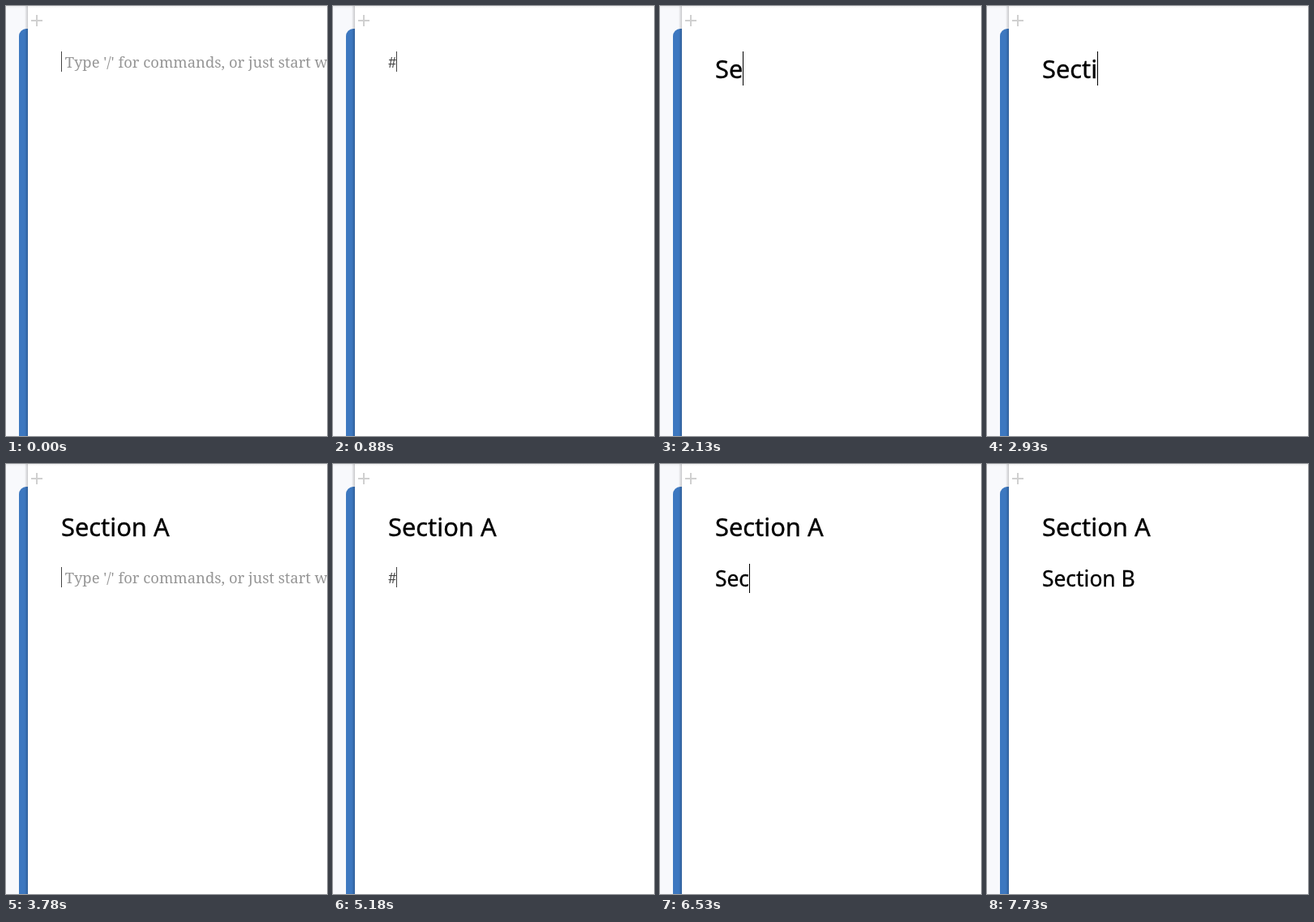
Recreate the animation shown at these times as an HTML page with a canvas. Size 396x530 px, loop 8 s.

```html
<!DOCTYPE html>
<html lang="en">
<head>
<meta charset="utf-8">
<title>Heading shortcuts</title>
<style>
html, body { margin: 0; width: 100%; height: 100%; overflow: hidden; background: #fff; }
canvas { display: block; width: 396px; height: 530px; }
</style>
</head>
<body>
<canvas id="stage"></canvas>
<script>
const W = 396, H = 530, LOOP = 8000, LEFT = 68;
const canvas = document.getElementById('stage');
const ctx = canvas.getContext('2d');
const dpr = window.devicePixelRatio || 1;
canvas.width = W * dpr;
canvas.height = H * dpr;

const SANS = '"Noto Sans", sans-serif';
const SERIF = '"Noto Serif", serif';
const HINT = "Type '/' for commands, or just start writing";

// Text styles: caret top and height, baseline, font and colour.
const styles = {
  body1: { top: 56, height: 25, base: 76, font: '18.4px ' + SERIF, color: '#444' },
  body2: { top: 127, height: 25, base: 147, font: '18.4px ' + SERIF, color: '#444' },
  h1: { top: 56, height: 42, base: 89, font: '30.84px ' + SANS, color: '#000', bold: 0.35 },
  h2: { top: 123, height: 36, base: 151, font: '26.4px ' + SANS, color: '#000', bold: 0.3 }
};

const spell = (text, times) =>
  times.map((t, i) => [t, { text: text.slice(0, i + 1), caret: 1, menu: 0 }]);

// Each entry changes part of the editor state at its time.
const timeline = [
  [0, { style: 'body1', text: '', caret: 1, menu: 0 }],
  [330, { caret: 0.75 }],
  [380, { caret: 0.5 }],
  [430, { caret: 0.25 }],
  [530, { caret: 0 }],
  [880, { text: '#', caret: 1 }],
  [1450, { style: 'h1', text: '' }],
  [1830, { menu: 1 }],
  ...spell('Section A', [2080, 2130, 2530, 2630, 2930, 3080, 3130, 3280, 3530]),
  [3780, { style: 'body2', text: '' }],
  [4480, { caret: 0.6 }],
  [4530, { caret: 0.25 }],
  [4680, { caret: 0 }],
  [5180, { text: '#', caret: 1 }],
  [5530, { text: '##' }],
  [5630, { style: 'h2', text: '', menu: 2 }],
  ...spell('Section B', [6080, 6130, 6530, 6680, 6980, 7080, 7180, 7230, 7530]),
  [7730, { caret: 0 }]
];

function stateAt(t) {
  const state = {};
  for (const [time, change] of timeline) {
    if (time > t) break;
    Object.assign(state, change);
  }
  return state;
}

function rect(x, y, w, h, color) {
  ctx.fillStyle = color;
  ctx.fillRect(x, y, w, h);
}

function fade(x0, y0, x1, y1, from, to) {
  const g = ctx.createLinearGradient(x0, y0, x1, y1);
  g.addColorStop(0, from);
  g.addColorStop(1, to);
  return g;
}

function drawPage() {
  rect(0, 0, W, H, '#fff');
  rect(0, 0, 27, H, '#f8f9fc');
  ctx.fillStyle = '#3d78c0';
  ctx.beginPath();
  ctx.roundRect(16, 28, 30, H, [9, 0, 0, 0]);
  ctx.fill();
  rect(23, 0, 4, H, fade(23, 0, 27, 0, 'rgba(0,0,0,0)', 'rgba(0,0,0,.2)'));
  rect(27, 0, W - 27, H, '#fff');
  rect(0, 0, W, 3, fade(0, 0, 0, 3, 'rgba(0,0,0,.05)', 'rgba(0,0,0,0)'));
  rect(31, 17, 14, 2, '#d0d0d0');
  rect(37, 11, 2, 14, '#d0d0d0');
}

function drawText(text, x, s) {
  ctx.font = s.font;
  ctx.fillStyle = ctx.strokeStyle = s.color;
  ctx.fillText(text, x, s.base);
  if (s.bold) {
    ctx.lineWidth = s.bold;
    ctx.strokeText(text, x, s.base);
  }
}

function drawCaret(text, s, alpha) {
  ctx.font = s.font;
  const x = Math.floor(LEFT + ctx.measureText(text).width);
  ctx.globalAlpha = alpha;
  rect(x, s.top, 1, s.height, s.color);
  ctx.globalAlpha = 1;
}

// Casts only the shadow of a box; the box itself lies off the stage.
function castShadow(x, y, w, h, dy, blur, spread, alpha) {
  const far = 2000;
  ctx.save();
  ctx.shadowColor = `rgba(0,0,0,${alpha})`;
  ctx.shadowBlur = blur * dpr;
  ctx.shadowOffsetX = far * dpr;
  ctx.shadowOffsetY = dy * dpr;
  rect(x - spread - far, y - spread, w + 2 * spread, h + 2 * spread, '#000');
  ctx.restore();
}

const digits = {
  1: new Path2D('M14 17h-2V9h-2V7h4z'),
  2: new Path2D('M15 11c0 1.1-.9 2-2 2h-2v2h4v2H9v-4c0-1.1.9-2 2-2h2V9H9V7h4c1.1 0 2 .9 2 2z')
};

function drawMenu(level) {
  const x = LEFT, y = level === 1 ? 104 : 166, w = 152, h = 40;
  castShadow(x, y, w, h, 5, 5, -3, 0.2);
  castShadow(x, y, w, h, 8, 10, 1, 0.14);
  castShadow(x, y, w, h, 3, 14, 2, 0.12);
  rect(x, y, w, h, '#fff');

  ctx.font = '14px "Liberation Sans", Arial, sans-serif';
  ctx.letterSpacing = '0.5px';
  ctx.fillStyle = '#626267';
  ctx.fillText('Heading ' + level, x + 10, y + 24);
  ctx.letterSpacing = '0px';

  ctx.strokeStyle = '#626267';
  ctx.lineWidth = 2;
  ctx.beginPath();
  ctx.moveTo(x + 85.3, y + 17.5);
  ctx.lineTo(x + 90, y + 22);
  ctx.lineTo(x + 94.7, y + 17.5);
  ctx.stroke();

  ctx.fillStyle = '#9e9e9e';
  ctx.beginPath();
  ctx.roundRect(x + 123, y + 11.5, 17, 17, 2);
  ctx.fill();
  ctx.save();
  ctx.translate(x + 131.5, y + 20);
  ctx.scale(17 / 18, 17 / 18);
  ctx.translate(-12, -12);
  ctx.fillStyle = '#fff';
  ctx.fill(digits[level]);
  ctx.restore();
}

function draw(t) {
  const state = stateAt(t);
  const s = styles[state.style];
  const isBody = state.style.startsWith('body');
  ctx.setTransform(dpr, 0, 0, dpr, 0, 0);
  drawPage();
  if (t >= 3780) drawText('Section A', LEFT, styles.h1);
  if (isBody && !state.text) drawText(HINT, 72.7, { ...s, color: '#969696' });
  drawText(state.text, LEFT, s);
  drawCaret(state.text, s, state.caret);
  if (state.menu) drawMenu(state.menu);
}

const start = performance.now();
function tick() {
  draw((performance.now() - start) % LOOP);
  requestAnimationFrame(tick);
}
tick();
</script>
</body>
</html>
```
